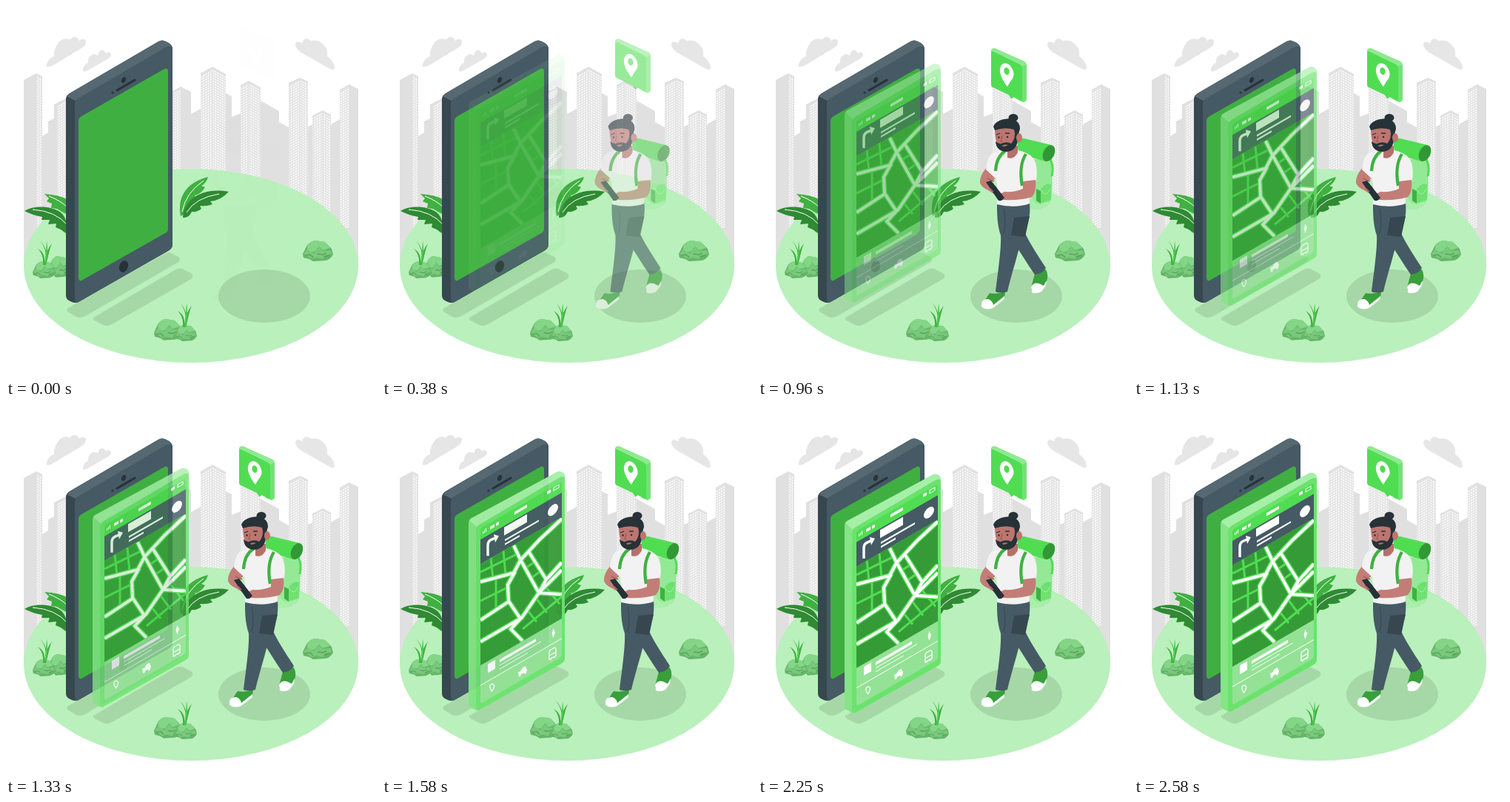
An HTML page for the animation above (2.62 s loop, 500 by 500 pixels).

```html
<!DOCTYPE html>
<html lang="en">
<head>
<meta charset="utf-8">
<title>Navigation app</title>
<style>
html,body{margin:0;height:100%;overflow:hidden;background:#fff}
svg{display:block;width:100vw;height:100vh}
.line{fill:none;stroke:#fff}
</style>
</head>
<body>
<svg viewBox="0 0 500 500">
<defs>
  <pattern id="down" width="3.2" height="3.5" patternUnits="userSpaceOnUse" patternTransform="skewY(28)"><path d="M.5 .6h2.1v2H.5z" fill="#fff"/></pattern>
  <pattern id="up" width="3.2" height="3.5" patternUnits="userSpaceOnUse" patternTransform="skewY(-28)"><path d="M.5 .6h2.1v2H.5z" fill="#fff"/></pattern>
  <g id="rock">
    <path d="M0 18L6 6Q12 0 17 0L30 2Q33 5 39 11L41 19Q37 26 30 27L14 28 9 25 1 23Z" fill="#66b569"/>
    <path d="M6 7Q12 0 17 0L30 2 37 10 27 13 22 8 16 15 6 15Z" fill="#83d686"/>
    <path d="M1 18L6 12 15 17 22 9 27 14 38 13 39 18 30 20 27 25 18 23 12 25Z" fill="#79c87c"/>
    <path d="M3 20l7-1 4 4M20 18l7 1 5-2M29 22l7-2" fill="none" stroke="#58a65b" stroke-width="1.4"/>
  </g>
  <g id="grass">
    <path d="M-1 0C4-12 2-23-6-33C4-23 5-10 1 0Z" fill="#40b041"/>
    <path d="M0 0C1-13 4-22 10-29C6-20 5-10 2 0Z" fill="#40b041"/>
    <path d="M0 0C2-13 2-22 3-32C5-22 4-10 1 0Z" fill="#50c852"/>
    <path d="M-2 0C-1-10-4-17-9-22C0-17 1-9 0 0Z" fill="#40b041"/>
  </g>
</defs>

<g fill="#e0e0e0">
  <path d="M24 100L41 91 49 95V176L57 171V156L65 152V133L81 125V350H24Z"/>
  <path d="M220 118L236 109 250 116V146L263 139V91L279 82 297 92V118L305 122V150L317 145V107L328 101 344 110V128L369 142V157L382 164V104L397 97 408 102V163L414 160V148L428 141 439 147V160L451 153V113L464 106 476 112V351H220Z"/>
</g>
<g fill="#e6e6e6">
  <path d="M55 82C54 76 59 70 65 68C64 60 68 54 72 48C77 44 83 43 86 46C90 40 97 41 99 47C103 44 108 44 108 48C108 53 104 56 99 59L62 81C58 83 56 83 55 82Z"/>
  <path d="M104 88C104 82 107 78 111 77C110 70 114 66 119 65Q122 65 124 67C126 58 132 58 135 64C139 61 142 63 142 66C141 70 137 72 133 74L112 86C108 89 105 89 104 88Z"/>
  <path d="M391 51C393 47 397 48 400 51C402 43 407 43 412 47C420 45 427 48 432 56Q435 61 434 68C440 72 444 78 444 84C443 87 439 86 436 84L399 63C394 60 391 56 391 51Z"/>
</g>
<g id="windows"></g>

<ellipse cx="250" cy="351" rx="226" ry="131" fill="#b9f0bb"/>
<g fill="#a6d8a7">
  <ellipse cx="349" cy="392" rx="62" ry="36"/>
  <path d="M84 408L214 335Q220 331 225 335L233 339Q237 343 233 346L109 418Q101 423 95 420L85 414Q80 411 84 408Z"/>
  <path d="M120 420L228 357Q234 353 240 356L250 361Q255 365 250 369L145 429Q137 434 131 431L120 425Q115 422 120 420Z"/>
</g>

<!-- plants -->
<path d="M52 254Q72 255 84 262V282Q76 279 69 274L61 273 62 267 55 264 58 260Z" fill="#40b041"/>
<path d="M25 277C38 269 62 270 74 279Q83 286 84 308Q78 306 74 302L67 299 68 294 57 295 59 289 48 289 49 285Q34 282 25 277Z" fill="#2f8a33"/>
<path d="M236 284C232 262 239 240 273 231Q271 239 264 243L269 245Q264 254 255 256L257 260Q246 266 243 280Z" fill="#40b041"/>
<path d="M239 286C240 264 262 244 301 251Q290 263 276 264L279 268Q270 271 262 270L264 274Q258 279 251 278Q247 287 239 286Z" fill="#2f8a33"/>
<path class="line" d="M58 257Q74 263 84 273M36 275Q67 277 83 296M238 278Q243 252 267 236M244 279Q256 259 288 254"/>
<use href="#rock" transform="translate(57 338) scale(.75 1.03)"/>
<use href="#rock" transform="translate(36 345) scale(.76 .82)"/>
<use href="#grass" x="52" y="350"/>
<use href="#rock" x="401" y="317"/>
<use href="#rock" transform="translate(200 423) scale(.93 1.03)"/>
<use href="#rock" transform="translate(228 431) scale(.73 .79)"/>
<use href="#grass" x="241" y="434"/>

<!-- device -->
<path d="M81 126Q81 121 86 118L206 48Q211 45 216 48L220 50Q225 53 225 58V322Q225 328 219 331L98 400Q94 402 89 400L85 398Q81 396 81 391Z" fill="#37474f"/>
<path d="M82 122Q83 120 86 118L206 48Q211 45 216 48L220 50Q223 52 224 55L94 128Z" fill="#566872"/>
<path d="M93 134Q93 127 99 124L217 55Q225 52 225 60V322Q225 328 219 331L98 400Q93 402 93 396Z" fill="#455a64"/>
<path d="M98 156Q98 151 102 149L214 85Q219 83 219 88V301Q219 305 215 307L102 371Q98 372 98 367Z" fill="#40af41"/>
<g fill="#263238">
  <ellipse cx="159" cy="100" rx="2.8" ry="4" transform="rotate(25 159 100)"/>
  <circle cx="144" cy="117" r="1.5"/>
  <ellipse cx="159" cy="352" rx="5.8" ry="8.2" transform="rotate(22 159 352)"/>
  <path d="M150 114L174 100" stroke="#263238" stroke-width="3" stroke-linecap="round"/>
</g>

<g id="app">
  <path d="M117 163Q117 158 121 156L236 94Q240 92 243 94L245 95Q247 97 247 100V345Q247 350 243 352L132 415Q129 417 126 415L119 411Q117 410 117 406Z" fill="#84e486"/>
  <path d="M118 159Q119 157 121 156L236 94Q240 92 243 94L245 95Q247 97 247 100L128 168Z" fill="#a6efa8"/>
  <path d="M127 173Q127 168 131 165L240 101Q247 98 247 104V345Q247 350 243 352L132 415Q127 417 127 411Z" fill="#6ae36c"/>
  <g transform="matrix(1 -.577 0 1 133 185)">
    <rect y="-15" width="110" height="237" rx="3" fill="#50dd52"/>
    <path d="M0 170H110V219Q110 222 107 222H3Q0 222 0 219Z" fill="#93e295"/>
    <path d="M0 0H110V33H0Z" fill="#455a64"/>
    <path d="M0 33H110V170H0Z" fill="#359b37"/>
    <g fill="#fff">
      <path d="M32 2H63V13H32ZM10 174H20V186H10ZM13-10h6v4h-6zM21-10h4v4h-4zM3-9h1v3h-1zM5-10h1v4h-1zM7-11h1v5h-1zM90-13h5v4h-5z"/>
      <circle cx="98" cy="16.5" r="7"/>
    </g>
    <g class="line">
      <path d="M46-9H63M26 179H75" stroke-width="4"/>
      <path d="M33 20H79M33 25.5H53" stroke-width="2.4"/>
      <path d="M26 185H82M26 190H64M0 197H110" stroke-width="1"/>
      <rect x="99" y="-13" width="7" height="4"/>
    </g>
  </g>
  <clipPath id="map"><path d="M133 218L243 154.5V291.5L133 355Z"/></clipPath>
  <g clip-path="url(#map)" fill="none" stroke="#50dd52" stroke-linejoin="round">
    <path d="M133 229L184 204M147 209L150 238M164 200L167 233M133 268L171 249M154 238V282M193 224L208 214M200 238L214 228M196 280L209 296M208 264L223 284M222 250L240 272M190 306L243 262" stroke-width="3"/>
    <path id="roads" d="M133 242L178 230 187 213 214 184 243 157M178 193L187 212 212 257 243 259M198 201L222 239 212 257M222 239L243 216M180 228L170 246 171 268 187 292M171 269L133 294M190 290L133 323M243 226L212 257 190 289 174 306 190 322" stroke-width="7"/>
    <use href="#roads" id="lanes"/>
  </g>
  <path class="line" d="M143 207V193Q143 187 148 185L153 183" stroke-width="3.4"/>
  <path d="M151 178L158 180 153 189Z" fill="#fff"/>
  <path class="line" stroke-width="1.3" d="M148.500 390Q144 384 147 381Q150 379 151.500 382Q152 385 148.500 390ZM226 337Q226 335 228 334L233 331Q235 331 235 333V342L226 347ZM226 342L235 337M228 346v2M233 343v2"/>
  <path d="M184 364L187 363 190 358 194 356 195 359 196 360 195 365 193 367 192 365 188 367 187 370 185 370ZM231.500 305L234 310 231.500 318 229.500 312Z" fill="#fff"/>
</g>

<g id="walker">
  <!-- backpack -->
  <path d="M368 207L396 207Q400 245 395 265Q388 275 372 275Q366 274 367 262Z" fill="#94e996"/>
  <path d="M367 256L377 268 395 264Q388 275 372 275Q366 274 367 262Z" fill="#a8efaa"/>
  <path d="M376 247L382 250V267L376 263Z" fill="#40b041"/>
  <path d="M382 248Q388 238 396 241V262L382 267Z" fill="#6fe171"/>
  <path d="M383 249Q388 260 395 247" fill="none" stroke="#a8efaa"/>
  <path d="M395 207Q400 217 397 230" fill="none" stroke="#50dd52" stroke-width="3"/>
  <path d="M350 180Q356 177 364 180L397 188 388 210 352 199Z" fill="#50dd52"/>
  <ellipse cx="393" cy="199" rx="7.500" ry="11.500" transform="rotate(25 393 199)" fill="#329835"/>
  <!-- legs -->
  <path d="M370 377L374 362 389 356Q393 364 390 372L384 384Q376 391 369 384Z" fill="#389f3a"/>
  <path d="M369 380Q372 373 380 375L386 378 390 371 389 378 383 386Q375 390 370 387Z" fill="#fff"/>
  <path d="M342 300H358C366 320 379 338 389 354Q386 361 374 363C365 350 356 335 346 320Z" fill="#455a64"/>
  <path d="M313 388Q323 390 334 386L333 395 318 408Q306 410 303 403Z" fill="#389f3a"/>
  <path d="M302 403Q302 396 311 396Q317 398 318 404L333 392V396L318 408Q307 412 302 406Z" fill="#fff"/>
  <path d="M323 266Q345 274 367 265C369 285 364 300 357 308C352 335 343 360 337 386Q328 389 321 386C325 355 329 325 328 310C323 295 323 280 323 266Z" fill="#455a64"/>
  <path d="M346 286L367 284 361 312 342 310Z" fill="#37474f"/>
  <path d="M332 274Q336 290 332 308" fill="none" stroke="#37474f"/>
  <!-- body -->
  <path d="M309 218Q299 230 300 239Q302 245 311 249L319 254 328 249 315 239 322 231V221Z" fill="#c37d77"/>
  <path d="M318 198Q328 194 338 196L352 195Q372 200 375 212Q378 222 376 236L359 238Q367 252 367 267Q347 274 323 268Q324 252 322 234L308 221Q310 202 318 198Z" fill="#f2f2f2"/>
  <path d="M337 189H351V198Q346 208 337 205Z" fill="#b66f6a"/>
  <path d="M334 196Q322 204 321 223M362 200Q352 216 357 243" fill="none" stroke="#40b041" stroke-width="4.200"/>
  <path d="M358 237L375 235Q377 251 370 258Q357 263 330 262L327 254 333 251Q347 252 358 247Z" fill="#c37d77"/>
  <path d="M308 238L315 236 333 259 329 263 325 263Z" fill="#263238"/>
  <path d="M310 233L319 237M313 246L318 251" stroke="#a9635f" stroke-width="1.500"/>
  <!-- head -->
  <path d="M320 165H350V184Q345 196 330 195Q320 190 320 165Z" fill="#bd7570"/>
  <path d="M318 163Q322 153 340 152Q354 154 354 166L351 177H348L346 167Q334 163 320 168Z" fill="#263238"/>
  <ellipse cx="345" cy="151" rx="6.500" ry="5.300" fill="#263238"/>
  <path d="M321 183Q327 188 331 185Q338 183 342 186Q347 181 347 173L351 176Q352 196 335 197Q322 196 321 183Z" fill="#263238"/>
  <ellipse cx="353" cy="178" rx="4" ry="6" fill="#bd7570"/>
  <path d="M329 189Q334 186 338 188L333 190Z" fill="#b66f6a"/>
  <path d="M322 174L327 172M334 172L340 172" stroke="#263238" stroke-width="1.300"/>
  <path d="M330 175L328 183H331" fill="none" stroke="#98534f"/>
  <circle cx="325.500" cy="177.500" r="1.300" fill="#263238"/>
  <circle cx="337" cy="177" r="1.300" fill="#263238"/>
</g>

<g id="sign">
  <path d="M315 61Q315 57 320 57L360 75Q363 77 363 81V126Q363 129 358 130L346 123 342 125 339 120 318 110Q315 109 315 106Z" fill="#72e274"/>
  <path d="M315 61Q315 57 320 57L360 75Q363 77 363 79L356 82Z" fill="#8fe991"/>
  <path d="M315 64Q315 60 319 62L354 79Q357 81 357 84V126Q357 129 354 128L346 123 342 125 339 120 318 110Q315 109 315 106Z" fill="#50dd52"/>
  <path d="M337 109C331 101 326 92 327 85C328 77 335 75 340 80C346 86 347 94 344 98Q340 103 337 109Z" fill="#fff"/>
  <ellipse cx="336" cy="88" rx="3.600" ry="5" transform="rotate(-15 336 88)" fill="#50dd52"/>
</g>
</svg>
<script>
const LOOP = 2620, LEAD = 40, SLIDE = 30;
const $ = id => document.getElementById(id);

// Window faces: left x, roof y, right x, roof y
const faces = [
  [41,91,49,95], [69,131,81,125], [226,114,236,109], [263,91,279,82], [279,82,297,92],
  [317,107,328,101], [328,101,344,110], [382,104,397,97], [397,97,408,102],
  [414,148,428,141], [428,141,439,147], [451,113,464,106]
];
$('windows').innerHTML = faces.map(([x, y, x2, y2]) =>
  `<path d="M${x + .5} ${y + 3}L${x2 - .5} ${y2 + 3}V300H${x + .5}Z" fill="url(#${y2 > y ? 'down' : 'up'})"/>`).join('');

// White lanes run along the middle of the green roads
const lanes = $('roads').cloneNode();
lanes.setAttribute('stroke', '#fff');
lanes.setAttribute('stroke-width', 4);
$('lanes').replaceWith(lanes);
lanes.id = 'lanes';

const bezier = (a, b, s) => 3 * (1 - s) ** 2 * s * a + 3 * (1 - s) * s * s * b + s ** 3;

// cubic-bezier(.36, -.01, .5, 1.38)
function ease(x) {
  if (x >= 1) return 1;
  let lo = 0, hi = 1;
  for (let i = 0; i < 24; i++) {
    const mid = (lo + hi) / 2;
    if (bezier(.36, .5, mid) < x) lo = mid; else hi = mid;
  }
  return bezier(-.01, 1.38, lo);
}

function slide(id, p, dx, dy) {
  const off = SLIDE * (p - 1);
  $(id).setAttribute('transform', `translate(${dx * off} ${dy * off})`);
  $(id).setAttribute('opacity', Math.min(1, Math.max(0, p)));
}

function draw(now) {
  const t = now % LOOP + LEAD;
  slide('app', ease(t / 2600), 0, 1);
  slide('walker', ease(t / 1000), 1, 0);
  slide('sign', ease(t / 1000), 0, 1);
  requestAnimationFrame(draw);
}
draw(0);
</script>
</body>
</html>
```
